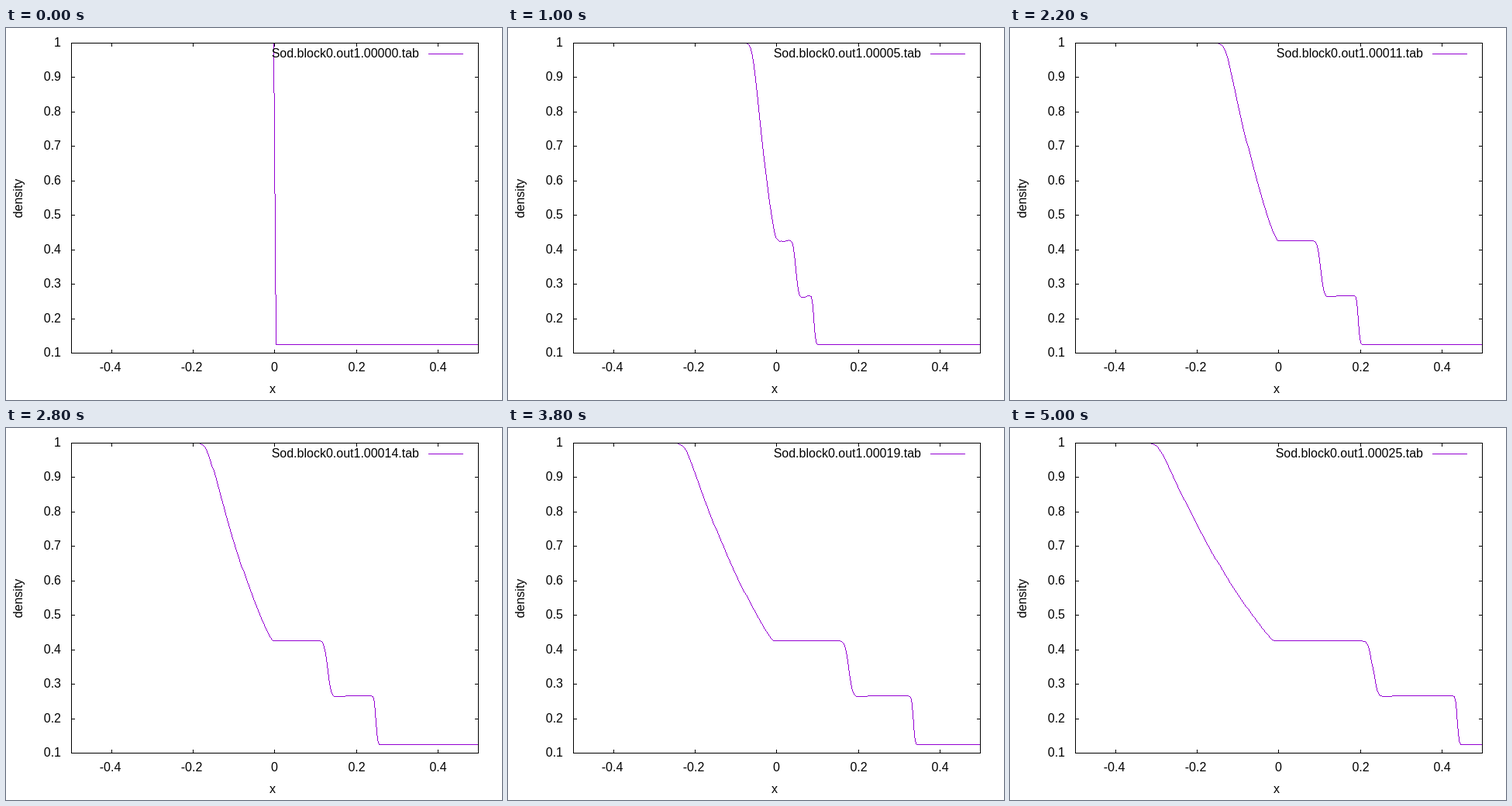
Write an HTML page with a canvas that moves like this. It is 640 px wide and 480 px high and loops after 5.2 s.

```html
<!DOCTYPE html>
<html lang="en">
<head>
<meta charset="utf-8">
<title>Shock tube density</title>
<style>
  html, body { margin: 0; width: 100%; height: 100%; overflow: hidden; background: #fff; }
  canvas, svg { position: absolute; left: 0; top: 0; width: 640px; height: 480px; }
  text { font: 16px "Liberation Sans", Arial, sans-serif; fill: #000; }
  path { fill: none; stroke: #000; shape-rendering: crispEdges; }
</style>
</head>
<body>
<canvas id="plot" width="640" height="480"></canvas>
<svg id="axes" viewBox="0 0 640 480">
  <path id="frame"/>
  <text x="344" y="471" text-anchor="middle">x</text>
  <text transform="translate(21 220) rotate(-90)" text-anchor="middle">density</text>
  <text id="key" x="533" y="38" text-anchor="end"></text>
</svg>
<script>
const LEFT = 84, RIGHT = 609, TOP = 19, BOTTOM = 419;
const COLOR = '#9400d3', FRAME_MS = 200, FRAMES = 26;
const toX = x => LEFT + (x + 0.5) * (RIGHT - LEFT);
const toY = d => TOP + (1 - d) / 0.9 * (BOTTOM - TOP);

// Shock tube: 1D Euler equations, two-stage van Leer scheme with HLLC fluxes
const CELLS = 256, GHOST = 2, SIZE = CELLS + 2 * GHOST, DX = 1 / CELLS;
const GAMMA = 1.4, CFL = 0.8;

const energy = ([r, u, p]) => p / (GAMMA - 1) + 0.5 * r * u * u;
const sound = ([r, , p]) => Math.sqrt(GAMMA * p / r);
const toConserved = w => [w[0], w[0] * w[1], energy(w)];
const toPrimitive = ([r, m, e]) => [r, m / r, (GAMMA - 1) * (e - 0.5 * m * m / r)];

function hllc(L, R) {
  const [rl, ul, pl] = L, [rr, ur, pr] = R;
  const cl = sound(L), cr = sound(R);
  const pMid = 0.5 * (pl + pr + (ul - ur) * 0.5 * (rl + rr) * 0.5 * (cl + cr));
  const factor = p => pMid <= p ? 1
    : Math.sqrt(1 + (GAMMA + 1) / (2 * GAMMA) * (pMid / p - 1));
  const al = ul - cl * factor(pl), ar = ur + cr * factor(pr);
  const ml = rl * (ul - al), mr = -rr * (ur - ar);
  const tl = pl + ml * ul, tr = pr - mr * ur;
  const speed = (tl - tr) / (ml + mr);
  const pStar = Math.max(0, (ml * tr + mr * tl) / (ml + mr));
  const side = (w, b) => {
    const [r, u, p] = w, v = u - b;
    return [r * v, r * u * v + p, energy(w) * v + p * u];
  };
  const b = speed >= 0 ? Math.min(al, 0) : Math.max(ar, 0);
  const flux = side(speed >= 0 ? L : R, b);
  const weight = speed / (speed - b), star = -b / (speed - b) * pStar;
  return b === 0 ? flux
    : [weight * flux[0], weight * flux[1] + star, weight * flux[2] + star * speed];
}

// Reconstructed state at the face of cell i, on side -1 or 1
function faceState(w, i, side) {
  return w[i].map((v, n) => {
    const a = v - w[i - 1][n], b = w[i + 1][n] - v;
    return a * b > 0 ? v + side * a * b / (a + b) : v;
  });
}

function advance(base, w, dt, linear) {
  const flux = [];
  for (let i = GHOST; i <= SIZE - GHOST; i++) {
    flux[i] = linear ? hllc(faceState(w, i - 1, 1), faceState(w, i, -1)) : hllc(w[i - 1], w[i]);
  }
  const next = base.map((state, i) => i < GHOST || i >= SIZE - GHOST ? state
    : toPrimitive(toConserved(state).map((q, n) => q - dt / DX * (flux[i + 1][n] - flux[i][n]))));
  for (let g = 0; g < GHOST; g++) {
    next[g] = next[GHOST];
    next[SIZE - 1 - g] = next[SIZE - 1 - GHOST];
  }
  return next;
}

function simulate() {
  const end = 0.25, profiles = [];
  let w = Array.from({ length: SIZE }, (_, i) => i < SIZE / 2 ? [1, 0, 1] : [0.125, 0, 0.1]);
  let time = 0, lastDt = Infinity;
  const save = () => profiles.push(w.slice(GHOST, SIZE - GHOST).map(s => s[0]));
  save();
  while (time < end) {
    const fastest = Math.max(...w.map(s => Math.abs(s[1]) + sound(s)));
    const dt = Math.min(CFL * DX / fastest, 2 * lastDt, end - time);
    w = advance(w, advance(w, w, dt / 2, false), dt, true);
    time += dt;
    lastDt = dt;
    if (time >= profiles.length * 0.01 - 1e-9) save();
  }
  return profiles;
}

const ctx = document.getElementById('plot').getContext('2d');
const key = document.getElementById('key');

// Hard-edged line on whole pixels
function pixelLine(x0, y0, x1, y1) {
  const steps = Math.max(Math.abs(x1 - x0), Math.abs(y1 - y0), 1);
  for (let s = 0; s <= steps; s++) {
    ctx.fillRect(Math.round(x0 + (x1 - x0) * s / steps), Math.round(y0 + (y1 - y0) * s / steps), 1, 1);
  }
}

function drawAxes() {
  const label = (x, y, value, anchor) => {
    const text = document.createElementNS('http://www.w3.org/2000/svg', 'text');
    text.setAttribute('x', x);
    text.setAttribute('y', y);
    text.setAttribute('text-anchor', anchor);
    text.textContent = value;
    document.getElementById('axes').append(text);
  };
  let d = `M${LEFT + .5} ${TOP + .5}H${RIGHT + .5}V${BOTTOM + .5}H${LEFT + .5}Z`;
  for (let n = -2; n <= 2; n++) {
    const x = Math.round(toX(n / 5) - (n < 1 ? 0.1 : 0));
    d += `M${x + .5} ${TOP}v5M${x + .5} ${BOTTOM + 1}v-5`;
    label(x + (n < 0 ? -1.5 : 0.5), 443, +(n / 5).toFixed(1), 'middle');
  }
  for (let n = 1; n <= 10; n++) {
    const y = Math.round(toY(n / 10));
    d += `M${LEFT} ${y + .5}h5M${RIGHT + 1} ${y + .5}h-5`;
    label(71, y + 5, n / 10, 'end');
  }
  document.getElementById('frame').setAttribute('d', d);
}

const profiles = simulate();
let shown = -1;

function draw(now) {
  const index = Math.floor(now / FRAME_MS) % FRAMES;
  if (index !== shown) {
    shown = index;
    key.textContent = `Sod.block0.out1.${String(index).padStart(5, '0')}.tab`;
    ctx.clearRect(0, 0, 640, 480);
    ctx.fillStyle = COLOR;
    pixelLine(545, 33, 589, 33);
    const points = profiles[index].map((density, i) =>
      [Math.round(toX((i + 0.5) * DX - 0.5)), Math.round(toY(density))]);
    for (let i = 1; i < points.length; i++) pixelLine(...points[i - 1], ...points[i]);
  }
  requestAnimationFrame(draw);
}

drawAxes();
draw(performance.now());
</script>
</body>
</html>
```
